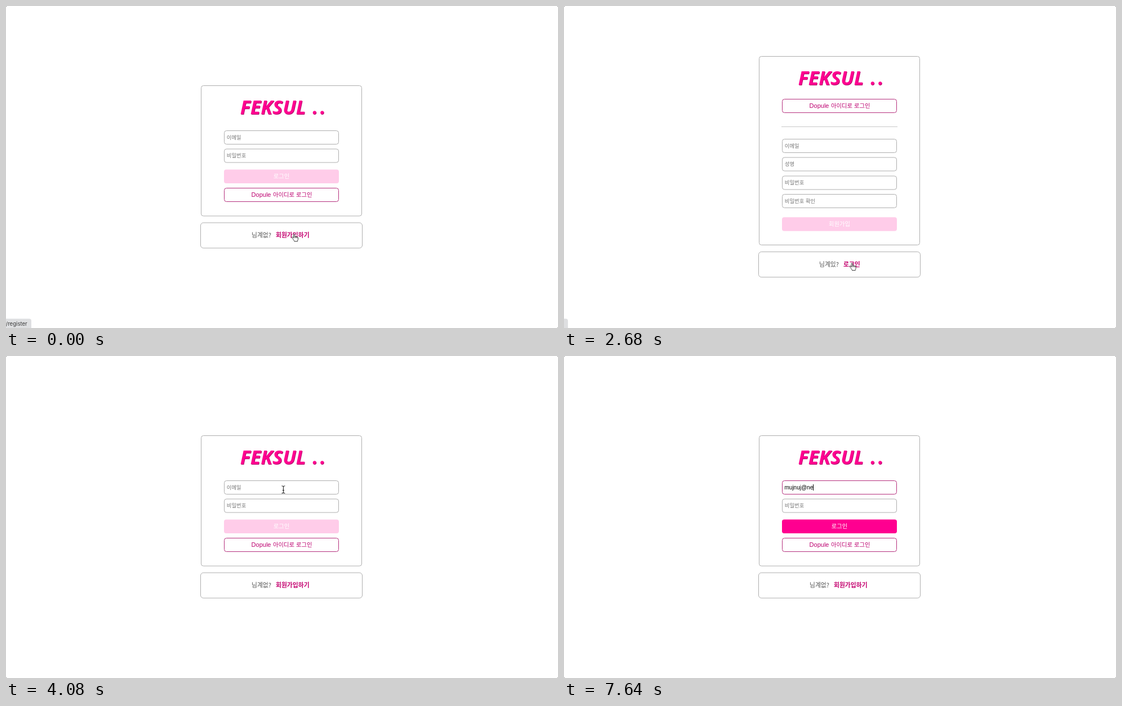
Recreate the animation shown at these times as an HTML page. Size 980 by 572 pixels, loop 8 s.

```html
<!DOCTYPE html>
<html lang="ko">
<head>
<meta charset="utf-8">
<title>Login form</title>
<style>
html, body { margin: 0; width: 100%; height: 100%; overflow: hidden; background: #8a8a8a; }
svg { display: block; width: 980px; height: 572px; }
text { font-family: "Noto Sans CJK KR", "Noto Sans CJK", sans-serif; white-space: pre; }
.card, .field { fill: #fff; stroke: #aeaeae; }
.line { stroke: #c8c8c8; }
.hint { font-size: 9.4px; fill: #757575; }
.submit { fill: #ff0090; }
.off { fill: #ffcce9; }
.label { font-size: 10.35px; fill: #fff; text-anchor: middle; }
.social rect { fill: #fff; stroke: #b52f7d; }
.social text { font-size: 10.35px; fill: #bd0070; }
.social .latin { font: 11px "Liberation Sans", Arial, sans-serif; }
.ask { font-size: 10.8px; fill: #555; }
.link { font-size: 10.8px; font-weight: 700; fill: #c4006f; }
.logo { font: italic 700 34px "Noto Sans", "Open Sans", sans-serif; }
.typed { font: 10px "Liberation Sans", Arial, sans-serif; fill: #000; }
.status rect { fill: #dedfe1; }
.status text { font: 9.6px Inter, sans-serif; fill: #3a3a3a; }
</style>
</head>
<body>
<svg viewBox="0 0 980 572">
  <defs>
    <text id="word" class="logo" y="192"><tspan x="416">FEKSUL</tspan><tspan x="544.5">.</tspan><tspan x="558">.</tspan></text>
    <g id="logo">
      <use href="#word" x=".6" y=".6" fill="#b00067"/>
      <use href="#word" x="-.2" y="-.1" fill="#ff0090"/>
    </g>
    <rect id="box" x="387.5" width="203" height="24" rx="4"/>
    <g id="social" class="social">
      <rect x="387.5" y="323.5" width="203" height="24" rx="4"/>
      <text class="latin" x="435.6" y="339">Dopule</text>
      <text x="474" y="338.8">아이디로 로그인</text>
    </g>
    <rect id="foot" class="card" x="345.5" y="385" width="287" height="45" rx="5"/>
  </defs>

  <rect width="980" height="572" rx="2.5" fill="#fff"/>

  <g id="login">
    <rect class="card" x="346.5" y="141.5" width="285" height="231.5" rx="4"/>
    <use href="#logo"/>
    <use id="email" class="field" href="#box" y="221.5"/>
    <text id="hint" class="hint" x="391.8" y="236.5">이메일</text>
    <text id="typed" class="typed" x="391.5" y="236.5"></text>
    <rect id="caret" y="228" width="1" height="11"/>
    <use class="field" href="#box" y="254"/>
    <text class="hint" x="391.8" y="269">비밀번호</text>
    <rect class="off" x="387" y="290.5" width="204" height="24.5" rx="4"/>
    <rect id="ready" class="submit" x="387" y="290.5" width="204" height="24.5" rx="4"/>
    <text class="label" x="489" y="306">로그인</text>
    <use href="#social"/>
    <use href="#foot"/>
    <text class="ask" x="436" y="410.7">님계없?</text>
    <text class="link" x="479" y="410.7">회원가입하기</text>
  </g>

  <g id="join">
    <rect class="card" x="346.5" y="89.5" width="285" height="335" rx="4"/>
    <use href="#logo" y="-52"/>
    <use href="#social" y="-158"/>
    <path class="line" d="M386 214.5H592"/>
    <use class="field" href="#box" y="236.5"/>
    <text class="hint" x="391.8" y="251.5">이메일</text>
    <use class="field" href="#box" y="269"/>
    <text class="hint" x="391.8" y="284.3">성명</text>
    <use class="field" href="#box" y="302"/>
    <text class="hint" x="391.8" y="317">비밀번호</text>
    <use class="field" href="#box" y="334.5"/>
    <text class="hint" x="391.8" y="349.7">비밀번호 확인</text>
    <rect class="off" x="387" y="375.2" width="204" height="24.5" rx="4"/>
    <text class="label" x="489" y="390.8">회원가입</text>
    <use href="#foot" y="51.7"/>
    <text class="ask" x="453" y="462.5">님계있?</text>
    <text class="link" x="496" y="462.5">로그인</text>
  </g>

  <g id="route" class="status">
    <rect x="-6" y="555.5" width="51" height="24" rx="4"/>
    <text x="-.3" y="568">/register</text>
  </g>
  <g id="blank" class="status">
    <rect x="-6" y="555.5" width="13" height="24" rx="4"/>
  </g>

  <g id="pointer">
    <path id="arrow" fill="#000" stroke="#fff" stroke-width=".8" d="M0 0V11L2.6 8.7 4.3 12.7 6.2 11.9 4.5 8H7.8Z"/>
    <path id="hand" fill="#fff" stroke="#222" stroke-width=".9" stroke-linejoin="round" d="M-1.3 6.8V.8c0-1.5 2.2-1.5 2.2 0v3.6c.3-1 2-.8 2 .4.4-.9 2-.6 2 .5.4-.7 1.8-.4 1.8.8v2.6c0 1.6-1 2-1 4h-5.6c0-1.2-1.4-2.4-2.3-4-.6-1-1.5-1.8-2-2.5-.5-.9 1-1.8 1.9-.9zM.9 4.4v2.4M2.9 4.8v2M4.9 5.3v1.7"/>
    <path id="beam" fill="none" stroke="#222" stroke-width="1.1" d="M-3-6.2Q-.3-6.2 0-5 .3-6.2 3-6.2M-3 6.8Q-.3 6.8 0 5.6 .3 6.8 3 6.8M0-5V5.6M-1.6 1.5H1.6"/>
  </g>
</svg>
<script>
const LOOP = 8000, TICK = 40, FOCUS = 4200;
const $ = id => document.getElementById(id);
const show = (id, on) => { $(id).style.display = on ? '' : 'none'; };
const mix = (a, b, p) => a + (b - a) * p;
const ramp = (t, a, b) => Math.min(1, Math.max(0, (t - a) / (b - a)));
const easeOut = p => 1 - (1 - p) ** 2;
const easeInOut = p => p * p * (3 - 2 * p);

const address = 'mujnuj@ne';
const keys = [5160, 5440, 5800, 6120, 6240, 6400, 7080, 7440, 7640];

// page, left, top, right, bottom, pointer shape
const zones = [
  ['login', 479, 399, 539, 415, 'hand'],
  ['login', 387, 323, 591, 348, 'hand'],
  ['login', 387, 254, 591, 278, 'beam'],
  ['login', 387, 221, 591, 246, 'beam'],
  ['join', 496, 450, 526, 467, 'hand']
];

function position(t) {
  if (t < 160) return [511.8, 405.4];
  if (t < 1120) return [511.2, 405];
  if (t < 3280) {
    const p = easeOut(ramp(t, 1860, 2440));
    return [mix(510.6, 511.5, p), mix(405, 457, p) + (t >= 2840 ? .5 : 0)];
  }
  const p = easeInOut(ramp(t, 3280, 4080));
  return [mix(511.5, 492.4, p), mix(457.5, 237, p)];
}

function drawPointer(t, page) {
  const [x, y] = position(t);
  const zone = zones.find(z => z[0] === page && x >= z[1] && x <= z[3] && y >= z[2] && y <= z[4]);
  const shape = zone ? zone[5] : 'arrow';
  for (const id of ['arrow', 'hand', 'beam']) show(id, id === shape);
  show('pointer', t < 4560);
  $('pointer').setAttribute('transform', `translate(${x} ${y})`);
}

function drawEmail(t) {
  const count = keys.filter(k => k <= t).length;
  const last = count ? keys[count - 1] : FOCUS;
  const text = address.slice(0, count);
  if ($('typed').textContent !== text) $('typed').textContent = text;
  show('hint', !count);
  const width = count ? $('typed').getComputedTextLength() : 0;
  $('caret').setAttribute('x', 391.3 + width);
  show('caret', t >= FOCUS && Math.floor((t - last) / 480) % 2 === 0);
  const p = ramp(t, FOCUS - TICK, FOCUS + 120);
  $('email').style.stroke = `rgb(${mix(174, 181, p)},${mix(174, 47, p)},${mix(174, 125, p)})`;
  $('ready').style.opacity = ramp(t, 5120, 5240);
}

function draw(t) {
  const page = t >= 1120 && t < 3000 ? 'join' : 'login';
  show('login', page === 'login');
  show('join', page === 'join');
  $('route').style.opacity = 1 - ramp(t, 1360, 1560);
  $('blank').style.opacity = ramp(t, 2560, 2680) - ramp(t, 3280, 3480);
  drawEmail(t);
  drawPointer(t, page);
}

const start = performance.now();
function frame() {
  const t = (performance.now() - start) % LOOP;
  draw(Math.floor(t / TICK) * TICK);
  requestAnimationFrame(frame);
}
frame();
</script>
</body>
</html>
```
